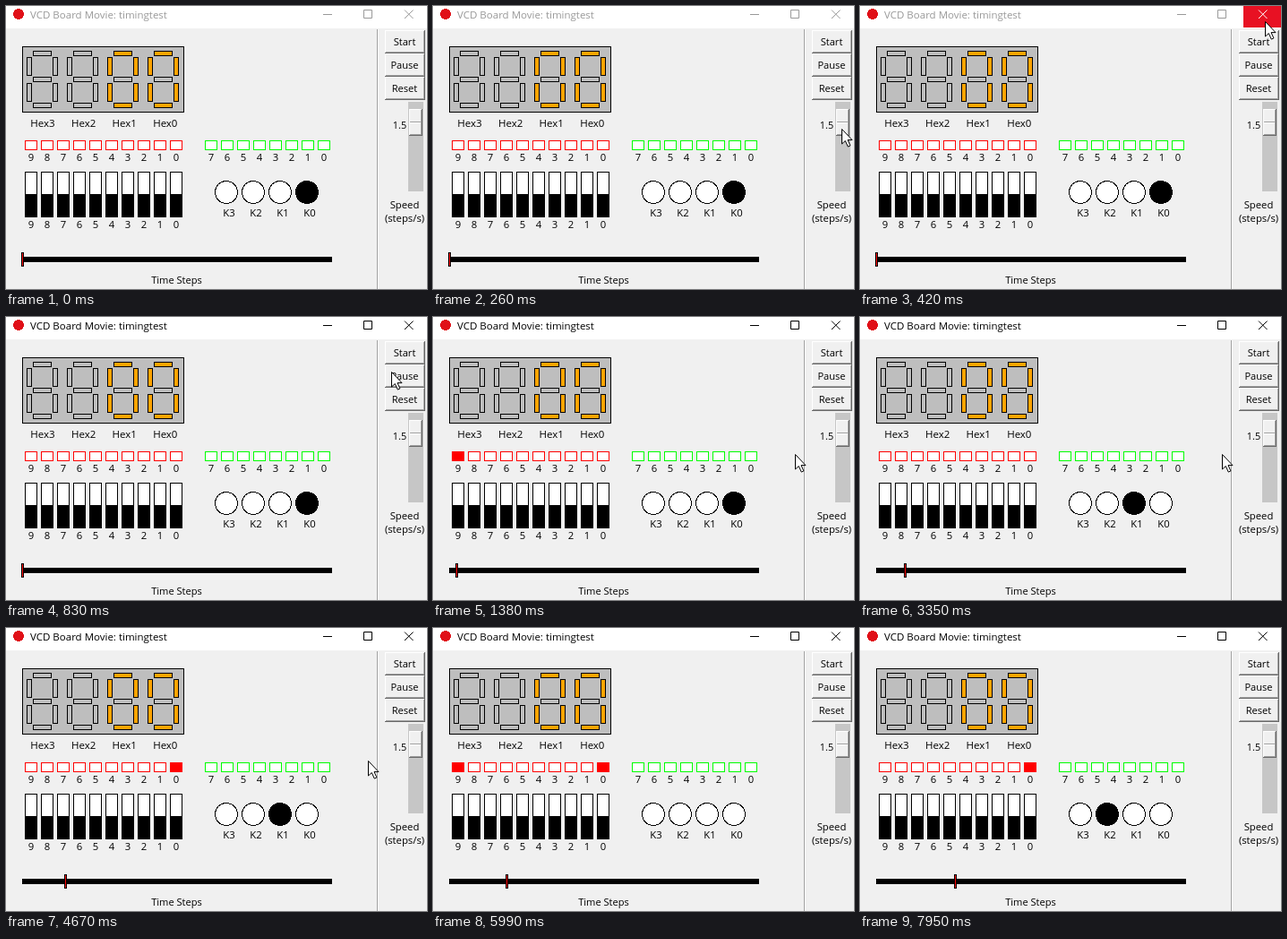
These frames come from a looping animation (470 by 316 pixels, 8000 ms). An HTML page:

```html
<!DOCTYPE html>
<html lang="en">
<head>
<meta charset="utf-8">
<title>VCD Board Movie</title>
<style>
  html, body { margin: 0; width: 470px; height: 316px; overflow: hidden; }
  svg { display: block; background: #f0f0f0; font: 11.3px "Open Sans", sans-serif; }
  rect, circle { shape-rendering: crispEdges; }
</style>
</head>
<body>
<svg id="stage" width="470" height="316"></svg>
<script>
const stage = document.getElementById('stage');

function set(node, attrs) {
  for (const name in attrs) node.setAttribute(name, attrs[name]);
}
function add(tag, attrs, text = '') {
  const node = document.createElementNS('http://www.w3.org/2000/svg', tag);
  set(node, attrs);
  node.textContent = text;
  return stage.appendChild(node);
}
const fillRect = (x, y, width, height, fill) => add('rect', { x, y, width, height, fill });
const box = (x, y, width, height, fill, stroke = '#000') =>
  add('rect', { x: x + .5, y: y + .5, width: width - 1, height: height - 1, fill, stroke });
const label = (text, x, y, size = 11.3, anchor = 'middle') =>
  add('text', { x, y, 'font-size': size, 'text-anchor': anchor }, text);
const line = d => add('path', { d, fill: 'none' });

function raised(x, y, w, h) {
  fillRect(x, y, w, h, '#696969');
  fillRect(x, y, w - 1, h - 1, '#fff');
  fillRect(x + 1, y + 1, w - 2, h - 2, '#a0a0a0');
  fillRect(x + 1, y + 1, w - 3, h - 3, '#f0f0f0');
}

// Title bar
fillRect(0, 0, 470, 25, '#fff');
add('circle', { cx: 14, cy: 9, r: 6, fill: '#e01018' });
const title = label('VCD Board Movie: timingtest', 27, 14, 11.5, 'start');
const closeBack = fillRect(428, 0, 42, 24, '#e81123');
const windowIcons = line('M354 9.5h10M399.5 4.5h9v9h-9z');
const closeIcon = line('M445 4.5l9.5 9.5m0 -9.5l-9.5 9.5');

// Seven-segment displays: two blank digits, then two zeros
box(18, 45, 181, 74, '#bebebe');
for (let i = 0; i < 4; i++) {
  const x = 23 + 45 * i, lit = i < 2 ? '#bebebe' : '#ffa500';
  for (let row = 0; row < 3; row++)
    box(x + 7, 50 + 29 * row, 21, 6, row === 1 ? '#bebebe' : lit);
  for (const dx of [0, 29])
    for (const dy of [7, 36]) box(x + dx, 50 + dy, 6, 21, lit);
  label('Hex' + (3 - i), 41 + 45.6 * i, 135, 11.5);
}

// LEDs, switches and keys, numbered from right to left
function numbered(count, left, pitch, labelY, make, prefix = '', shift = 7) {
  const parts = [];
  for (let n = count - 1; n >= 0; n--) {
    const x = left + pitch * (count - 1 - n);
    parts[n] = make(x);
    label(prefix + n, x + shift, labelY);
  }
  return parts;
}
const redLeds = numbered(10, 21, 18, 173, x => box(x, 150, 14, 11, '#fff', '#f00'));
numbered(8, 222, 18, 173, x => box(x, 150, 14, 11, '#fff', '#0f0'));
numbered(10, 21, 18, 248, x => {
  box(x, 185, 14, 51, '#fff');
  fillRect(x, 210, 14, 26, '#000');
});
const keys = numbered(4, 246, 30, 235,
  cx => add('circle', { cx, cy: 208, r: 12.5, stroke: '#000' }), 'K', 3);

// Time line
fillRect(18, 280, 346, 6, '#000');
const marker = box(17, 275, 3, 16, '#f00');
label('Time Steps', 190.5, 310, 11.1);

// Control panel
fillRect(414, 26, 1, 290, '#a0a0a0');
fillRect(415, 26, 1, 290, '#fff');
['Start', 'Pause', 'Reset'].forEach((name, i) => {
  raised(423, 27 + 26 * i, 45, 26);
  label(name, 445, 44 + 26 * i, 11.1);
});
fillRect(449, 107, 17, 100, '#c6c6c6');
raised(450, 115, 15, 30);
fillRect(451, 129, 12, 1, '#a0a0a0');
fillRect(451, 130, 12, 1, '#fff');
label('1.5', 439.5, 137, 10.9);
label('Speed', 445, 226);
label('(steps/s)', 445, 241);

const cursor = add('path', {
  d: 'M.5 .5v16.5l3.8-3.5 3 6.6 2.6-1.2-2.9-6.3h5z', fill: '#fff', stroke: '#000'
});

// Pointer moves: start time, duration, destination
const moves = [[20, 400, 452, 17], [420, 180, 444, 46], [800, 30, 430, 61],
  [830, 170, 390, 135], [1000, 130, 404, 153], [4200, 130, 404, 148], [5640, 110, 409, 318]];

function cursorAt(t) {
  let x = 462, y = 318;
  for (const [start, duration, toX, toY] of moves) {
    const k = Math.min(1, Math.max(0, (t - start) / duration));
    x += (toX - x) * k;
    y += (toY - y) * k;
  }
  return [Math.round(x), Math.round(y)];
}

const led9Signal = '011001001010';

function draw(now) {
  const t = now % 8000;
  const step = Math.max(0, Math.floor((t - 1378) / 657) + 1);
  const [x, y] = cursorAt(t);
  const hover = x >= 428 && y < 25;
  const iconColor = t >= 660 ? '#000' : '#999';

  set(redLeds[9], { fill: led9Signal[step] === '1' ? '#f00' : '#fff' });
  set(redLeds[0], { fill: step >= 5 ? '#f00' : '#fff' });
  const pressed = [step < 2, step >= 4 && step < 7, step >= 11, false];
  keys.forEach((key, i) => set(key, { fill: pressed[i] ? '#000' : '#fff' }));
  set(marker, { x: 17.5 + 8 * step });

  set(title, { fill: iconColor });
  set(windowIcons, { stroke: iconColor });
  set(closeIcon, { stroke: hover ? '#fff' : iconColor });
  set(closeBack, { visibility: hover ? 'visible' : 'hidden' });
  set(cursor, { transform: `translate(${x} ${y})` });
  requestAnimationFrame(draw);
}
draw(0);
</script>
</body>
</html>
```
